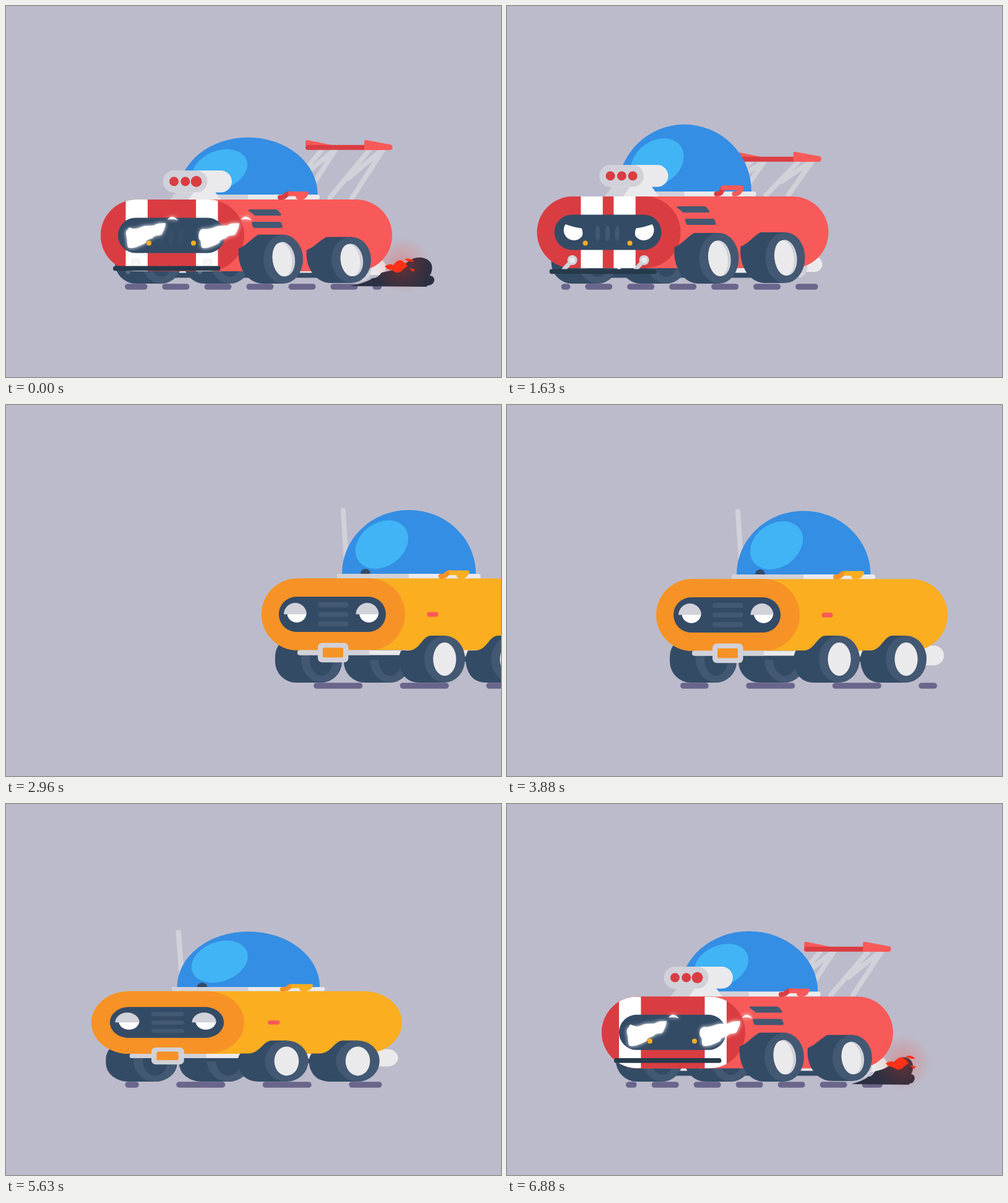
Animation, 800 px wide and 600 px high, one loop 6.93 s. Source, as an HTML page:

```html
<!DOCTYPE html>
<html lang="en">
<head>
<meta charset="utf-8">
<title>Car upgrade</title>
<style>
  html, body { margin: 0; width: 100%; height: 100%; overflow: hidden; background: #bcbbcb; }
  svg { display: block; width: 800px; height: 600px; }
</style>
</head>
<body>
<svg id="stage" viewBox="0 0 800 600" xmlns="http://www.w3.org/2000/svg"></svg>
<script>
const LOOP = 6930, SWAP = 6460;
const NAVY = '#344b66', STEEL = '#435872', GREY = '#d1d1d9', PALE = '#eaeaec';
const RED = '#f85a59', CRIMSON = '#d93d42', YELLOW = '#faae20', ORANGE = '#f79226', FLAME = '#ff3217';

const clamp = (v, a = 0, b = 1) => Math.min(b, Math.max(a, v));
const ramp = (t, a, b) => clamp((t - a) / (b - a));
const mod = (v, n) => ((v % n) + n) % n;

const bar = (x, y, w, h, fill, r = h / 2) =>
  `<rect x="${x}" y="${y}" width="${w}" height="${h}" rx="${r}" fill="${fill}"/>`;
const oval = (x, y, rx, ry, fill, turn = 0) =>
  `<ellipse cx="${x}" cy="${y}" rx="${rx}" ry="${ry}" fill="${fill}" transform="rotate(${turn} ${x} ${y})"/>`;
const shape = (d, fill) => `<path d="${d}" fill="${fill}"/>`;
const stroke = (d, color, w, id = '') =>
  `<path ${id && `id="${id}"`} d="${d}" fill="none" stroke="${color}" stroke-width="${w}" stroke-linecap="round" stroke-linejoin="round"/>`;
const group = (id, inner, attrs = '') => `<g id="${id}" ${attrs}>${inner}</g>`;
const shift = (x, y, inner) => `<g transform="translate(${x} ${y})">${inner}</g>`;

const farWheel = x => bar(x, 373, 108, 76, NAVY, 34) +
  oval(x + 75, 411, 33, 38, STEEL) + oval(x + 75, 411, 19, 27, NAVY);

const dome = y => shape(`M130,${y}A108.2 ${y === 274 ? 102.7 : 108.5} 0 0 1 346.4,${y}Z`, '#348ee4') +
  oval(194.5, y - 47, 46, 35, '#40b4f4', -35);

const sill = y => bar(122, y, 232, 7.8, PALE) +
  shape(`M126,${y}H238V${y + 7.8}H126A3.9 3.9 0 0 1 126,${y}Z`, GREY);

const hull = (y, side, front) => bar(0, y, 471, 116, side) + bar(0, y, 232, 116, front);

const foldedHandle = (dark, light) => stroke('M290,278C300,279 297,272 305,272', dark, 8) +
  shape('M303,268.5H333Q338,269 335,274Q331,282 323,282Q315,282 315,276H303Z', light);

function yellowCar() {
  const tire = shape('M296,373H274C260,373 256,397 238,397H226C221,404 221,418 225,428C230,442 240,449 256,449H296Z', NAVY) +
    oval(296, 411, 33, 38, STEEL) + oval(296, 411, 18.6, 27, PALE);
  const lamp = x => shape(`M${x - 13},339A15.6 15.6 0 0 0 ${x + 18},339Z`, '#fff') +
    shape(`M${x - 18.5},339.6A18.5 18.5 0 0 1 ${x + 18.5},339.6Z`, GREY);
  return `<path id="yDash" stroke="#6a658b" stroke-width="9.6" stroke-linecap="round"/>` + group('yCar',
    group('yPipe', bar(395, 389, 70, 32, PALE) + oval(422, 405, 15, 16, GREY)) +
    bar(285, 407, 75, 8, NAVY) +
    group('yFarA', farWheel(22)) + group('yFarB', farWheel(133) + shape('M150,394H235V412H150Z', NAVY)) +
    bar(230, 396, 125, 9, PALE) +
    group('yBody',
      group('yTop',
        stroke('M132,172L138,268', GREY, 8, 'antenna') + dome(274) +
        shape('M160,274A8 8 0 0 1 176,274Z', NAVY)) +
      sill(274) +
      group('yBlower', bar(126, 249, 64, 36, PALE) + bar(126, 249, 48, 36, GREY)) +
      hull(281.6, YELLOW, ORANGE) + foldedHandle(ORANGE, YELLOW) +
      bar(28, 311, 173, 57, NAVY) +
      [320, 335.7, 351].map(y => bar(91, y, 49.5, 8, STEEL)).join('') +
      lamp(54.5) + lamp(171) +
      bar(267.5, 335.8, 18, 7.8, RED) +
      group('bumper', bar(58, 397.6, 181.5, 8, PALE) +
        shape('M62,397.6H174V405.6H62A4 4 0 0 1 62,397.6Z', GREY)) +
      group('plate', bar(91, 385.7, 49.5, 31.5, GREY, 7) + bar(99, 393.6, 33, 15.6, ORANGE, 2))) +
    group('yRear', shift(108, 0, tire)) + group('yFront', tire));
}

function redCar() {
  const tire = shape('M295,367H254C243,373 234,386 222,390C219,421 236,449 262,449H295Z', NAVY) +
    oval(294, 408, 32, 41, STEEL) + oval(295, 408, 18, 29, GREY, -7) + oval(292.5, 408.5, 15.7, 28.6, PALE, -7);
  const lampL = 'M46,353Q60,358 72,359.5Q75,367 73,372A16 16 0 1 1 46,353Z';
  const pin = x => stroke(`M${x - 13},425L${x},411`, GREY, 7) + oval(x, 411, 8, 8, GREY) + oval(x, 411, 4.5, 4.5, PALE);
  const flare = shape('M41,370C40,362 44,359 51,361L62,359C70,354 78,356 86,355C92,350 100,352 105,351C105,358 101,364 99,369C94,373 88,369 84,375C78,378 73,378 73,383C64,388 52,393 45,391C42,388 44,380 41,370Z', '#fff') +
    shape('M108,346Q115,335 125,347Q116,343 108,346Z', '#fff');
  const intake = (x, i) => `<circle class="intake" cx="${x}" cy="274.7" r="7.5" fill="${CRIMSON}"/>`;
  return `<path id="rDash" stroke="#6a658b" stroke-width="9.6" stroke-linecap="round"/>` + group('rCar',
    group('rUnder', bar(415, 405, 46, 25, PALE) + oval(424, 420, 13, 19, GREY) + bar(100, 424, 245, 8.5, PALE)) +
    bar(60, 431.5, 330, 8, NAVY) +
    farWheel(23) + farWheel(134) +
    group('rBody',
      stroke('', GREY, 8, 'struts') +
      group('wing',
        shape('M319,239Q319,235 323,236L367,245H319Z', RED) +
        bar(319, 243.7, 105, 8, CRIMSON) +
        shape('M414,239Q414,235 418,236L456,243Q460,244 459.5,248Q459,252 455,252H414Z', RED)) +
      group('rDome', dome(300)) + sill(300) +
      group('rBlower',
        shape('M125,288L108,309H142L156,288Z', GREY) + shape('M154,288L138,309H198L182,288Z', PALE) +
        bar(101, 257, 111, 35.5, PALE) + bar(101, 257, 71.5, 35.5, GREY) +
        [118.5, 136.8].map(x => oval(x, 274.7, 7.5, 7.5, CRIMSON)).join('') +
        `<circle id="intake" cx="154.6" cy="274.7" fill="${CRIMSON}"/>`) +
      hull(308, RED, CRIMSON) +
      `<g clip-path="url(#face)"><rect id="stripeL" y="308" width="35.4" height="116" fill="#fff"/><rect id="stripeR" y="308" width="35.4" height="116" fill="#fff"/></g>` +
      group('folded', shift(0, 26.5, foldedHandle(CRIMSON, RED))) +
      group('raised', stroke('M290,304C301,304 297,297 301,294', CRIMSON, 8) +
        stroke('M301,294H329Q331,294 328,299Q325,304 319,304', RED, 8)) +
      bar(28, 337.4, 173, 57, NAVY) +
      group('slots', [94, 110, 125.5].map(x => bar(x, 355, 8, 25, STEEL)).join('')) +
      shape(lampL, '#fff') + `<path d="${lampL}" fill="#fff" transform="matrix(-1 0 0 1 232 0)"/>` +
      group('ventA', shape('M228,324H270Q272,324 274,326L279,332Q279,334 277,334H237Q235,334 234,332L226,326Q225,324 228,324Z', STEEL)) +
      group('ventB', shape('M241,344H284Q286,344 287,346L289,352Q289,354 287,354H244Q242,354 241,352L239,346Q239,344 241,344Z', STEEL)) +
      group('pins', pin(57) + pin(173)) +
      group('splitter', bar(20, 425.4, 173.5, 7.8, '#263a4b'))) +
    group('rRear', shift(107, -1, tire)) + group('rFront', tire) +
    group('flare', flare + shift(119, 0, flare), 'filter="url(#glow)"') +
    oval(78, 383.5, 4, 4, YELLOW) + oval(150, 383.5, 4, 4, YELLOW).replace('<ellipse', '<ellipse')) +
    group('smoke',
      shape('M556,453Q586,446 592,440Q600,441 607,431C630,427 640,421 651,412C666,401 690,408 688,425Q687,433 684,436C695,436 694,452 681,452L679,454Z', '#2c3042')) +
    group('fire', `<circle cx="640" cy="419" r="46" fill="url(#heat)"/>` +
      shape('M612,421Q621,415 626,419Q631,411 638,411Q645,414 649,421Q643,424 639,429Q631,434 624,427Q617,427 612,421Z', FLAME) +
      shape('M644,410Q651,406 660,413Q652,415 644,410Z', FLAME) + shape('M651,424L661,426L658,430Z', FLAME));
}

const stage = document.getElementById('stage');
stage.innerHTML = `<defs>
  <clipPath id="face"><rect y="308" width="232" height="116" rx="58"/></clipPath>
  <filter id="glow" x="-20%" y="-60%" width="140%" height="220%">
    <feGaussianBlur stdDeviation="3" result="b"/><feMerge><feMergeNode in="b"/><feMergeNode in="SourceGraphic"/></feMerge>
  </filter>
  <radialGradient id="heat"><stop offset="0" stop-color="#ff3217" stop-opacity=".28"/><stop offset="1" stop-color="#ff3217" stop-opacity="0"/></radialGradient>
</defs><rect width="800" height="600" fill="#bcbbcb"/>` + group('yellow', yellowCar()) + group('red', redCar());

const el = {};
stage.querySelectorAll('[id]').forEach(n => el[n.id] = n);
const set = (id, name, value) => el[id].setAttribute(name, value);
const place = (id, value) => set(id, 'transform', value);
const show = (id, on) => set(id, 'display', on ? 'inline' : 'none');
const move = (id, x, y) => place(id, `translate(${x} ${y})`);

function dashes(base, start, length, period) {
  let d = '';
  for (let x = mod(start, period) - period; x < 454; x += period) {
    const a = Math.max(x, 39), b = Math.min(x + length, 454);
    if (b - a > 9) d += `M${base + a + 4.8},454H${base + b - 4.8 + .01}`;
  }
  return d;
}

// time, lift, tilt, width, height, easing into this pose
const soft = u => u * u * (3 - 2 * u);
const poses = [
  [5150, 0, 0, 1, 1, soft],
  [5690, 0, 0, 1.068, .87, soft],
  [6170, -123.5, 11.3, .965, 1.06, u => 1 - (1 - u) ** 2],
  [6420, -128, 4, .98, 1.05, soft],
  [6720, 0, 0, 1, 1, u => u * u]
];
function poseAt(t) {
  const i = poses.findIndex(p => t < p[0]);
  if (i < 1) return [0, 0, 1, 1];
  const [from, to] = [poses[i - 1], poses[i]];
  const u = to[5](ramp(t, from[0], to[0]));
  return [1, 2, 3, 4].map(k => from[k] + (to[k] - from[k]) * u);
}
const carTransform = (base, middle, [lift, tilt, sx, sy]) =>
  `translate(${base + 235.5} ${449 - (449 - middle) * sy + lift}) rotate(${tilt}) scale(${sx} ${sy}) translate(-235.5 ${-middle})`;

// wheels hang and stretch while the car is in the air
const hang = (id, x, air, dx, dy) =>
  place(id, `translate(${x + dx * air} ${411 + dy * air}) rotate(${4 * air}) scale(1 ${1 + .1 * air}) translate(${-x} -411)`);

function drawYellow(t) {
  const base = 153 + Math.max(0, .0021 * (6000 - t)) ** 3;
  const pose = poseAt(t), air = clamp(-pose[0] / 123.5);
  const bob = (1 - Math.cos(2 * Math.PI * (t - 3880) / 490)) / 2 * (1 - ramp(t, 5300, 5500));
  set('yDash', 'd', dashes(base, 72 + .0663 * (t - 4880), 79, 139.5));
  place('yCar', carTransform(base, 339.6, pose));
  move('yBody', 0, -7 * bob);
  place('yTop', `translate(0 274) scale(1 ${1 + .04 * bob + .045 * air}) translate(0 -274)`);
  place('antenna', `rotate(${-4.5 * air} 138 268)`);
  move('bumper', 0, 3 * air);
  move('plate', 0, 10 * air);
  move('yPipe', 0, -7 * air);
  hang('yFront', 296, air, -8, 11);
  hang('yRear', 404, air, -10, 8);
  move('yFarA', 9 * air, -12 * air);
  move('yFarB', 0, 28 * air);
  place('yBlower', `translate(168 284) scale(${soft(ramp(t, 6080, 6170))}) translate(-168 -284)`);
}

function drawRed(t) {
  const late = t > 5000, tau = late ? t - LOOP : t;
  const base = 153 - Math.max(0, .00407 * (tau - 474)) ** 3;
  const spring = tau < -95 ? 0 : -.145 * Math.cos(Math.PI * (tau - 30) / 250) * Math.exp((30 - tau) / 340);
  const k = -spring / .147;
  const bob = 2.2 * (1 - Math.cos(2 * Math.PI * (t - 1630) / 490)) * ramp(tau, 700, 1000);
  const settle = Math.exp(-Math.max(tau, -200) / 145), early = Math.min(1, settle);
  set('rDash', 'd', dashes(base, 31 + .4455 * (late ? t - 6922 : t), 44, 68));
  place('rCar', carTransform(base, 366, late ? poseAt(t) : [0, 0, 1, 1]));
  move('rBody', 0, 5 * k - bob);
  move('rUnder', 0, 5 * k);
  place('rDome', `translate(238 300) scale(${1 + .04 * k} ${1 + spring}) translate(-238 -300)`);
  move('rBlower', 0, 4 * k);
  set('intake', 'r', 7.5 + 1.5 * early);

  const squat = (id, x, s) => place(id, `translate(${x * early} 449) scale(1 ${1 - s * early}) translate(0 -449)`);
  squat('rFront', 1, .035);
  squat('rRear', 4, .09);

  const wx = 12 * k, wy = -24 * k;
  move('wing', wx, wy);
  const strut = (a, b, y) => `M${a + wx},${252 + wy}L${b + wx * (308 - y) / 56},${y + wy * (308 - y) / 56}`;
  set('struts', 'd', [0, -77].map(o =>
    strut(444 + o, 406 + o, 306) + strut(422 + o, 370 + o, 306) + strut(442 + o, 395 + o, 284)).join(''));

  const half = 26.5 + 30.5 * settle;
  set('stripeL', 'x', 115 - half - 17.7);
  set('stripeR', 'x', 115 + half - 17.7);
  move('ventA', 13 * early, 0);
  move('ventB', 5 * early, 0);
  move('splitter', 0, -10 * Math.min(settle ** 1.7, 3));
  for (const id of ['pins', 'slots']) set(id, 'opacity', ramp(tau, -60, 180));
  show('folded', tau < 120);
  show('raised', tau >= 120);

  const flare = ramp(tau, -160, -60) * (1 - ramp(tau, 300, 600));
  set('flare', 'opacity', flare);
  show('flare', flare > 0);

  const growth = Math.max(0, tau < 0 ? 1 + tau / 200
    : 1 + .8 * Math.sin(Math.PI / 2 * ramp(tau, 0, 260)) - 1.8 * ramp(tau, 400, 1050));
  const height = growth && Math.min(1.6, growth) * .25 + .75;
  place('smoke', `translate(${base + 405} 453) scale(${growth} ${height}) translate(-558 -453)`);
  set('smoke', 'opacity', 1 - ramp(tau, 700, 1050));
  move('fire', base - 153, 1.5 * Math.sin(tau / 30));
  set('fire', 'opacity', ramp(tau, -150, -70) * (1 - ramp(tau, 350, 650)));
}

function draw(t) {
  const showYellow = t > 1800 && t < SWAP, showRed = t < 2700 || t >= SWAP;
  show('yellow', showYellow);
  show('red', showRed);
  if (showYellow) drawYellow(t);
  if (showRed) drawRed(t);
}

const begin = performance.now();
function tick() {
  draw((performance.now() - begin) % LOOP);
  requestAnimationFrame(tick);
}
tick();
</script>
</body>
</html>
```
